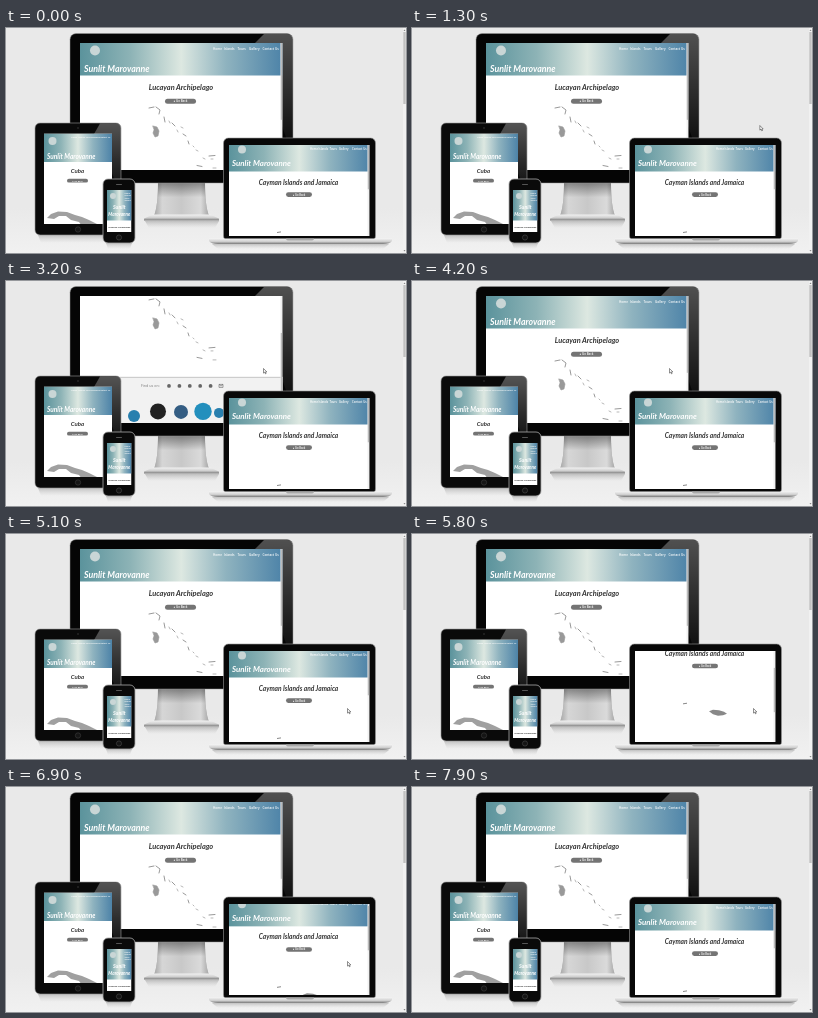
These frames come from a looping animation (400x225 px, 8 s). An HTML page:

```html
<!DOCTYPE html>
<html lang="en">
<head>
<meta charset="utf-8">
<title>Responsive preview</title>
<style>
html, body { margin: 0; width: 100%; height: 100%; overflow: hidden; background: #e9e9e9; }
#stage { display: block; width: 100vw; height: 100vh; }
text { font-family: "Open Sans", sans-serif; }
.script { font-family: Lato, sans-serif; font-style: italic; font-weight: 700; }
.mid { text-anchor: middle; }
.nav { fill: #fff; font-weight: 600; }
</style>
</head>
<body>
<svg id="stage" viewBox="0 0 400 225">
  <defs>
    <linearGradient id="floor" x2="0" y2="1">
      <stop offset=".8" stop-color="#e9e9e9"/><stop offset="1" stop-color="#f1f1f1"/>
    </linearGradient>
    <linearGradient id="sea">
      <stop stop-color="#5b939c"/><stop offset=".25" stop-color="#8db3b6"/>
      <stop offset=".5" stop-color="#dde8e1"/><stop offset=".72" stop-color="#8fb3bf"/>
      <stop offset="1" stop-color="#4d83a8"/>
    </linearGradient>
    <linearGradient id="shine" x2="0" y2="1">
      <stop stop-color="#fff" stop-opacity=".3"/><stop offset="1" stop-color="#fff" stop-opacity="0"/>
    </linearGradient>
    <linearGradient id="neck">
      <stop stop-color="#a5a5a5"/><stop offset=".15" stop-color="#d6d6d6"/>
      <stop offset=".5" stop-color="#c8c8c8"/><stop offset=".85" stop-color="#dadada"/>
      <stop offset="1" stop-color="#a5a5a5"/>
    </linearGradient>
    <linearGradient id="neckShade" x2="0" y2="1">
      <stop stop-color="#000" stop-opacity=".4"/><stop offset=".45" stop-color="#000" stop-opacity="0"/>
    </linearGradient>
    <linearGradient id="metal" x2="0" y2="1">
      <stop stop-color="#f2f2f2"/><stop offset=".55" stop-color="#cfcfcf"/><stop offset="1" stop-color="#777"/>
    </linearGradient>
    <linearGradient id="fade" x2="0" y2="1">
      <stop stop-color="#555" stop-opacity=".3"/><stop offset="1" stop-color="#999" stop-opacity="0"/>
    </linearGradient>
  </defs>
  <rect width="400" height="225" fill="url(#floor)"/>
  <rect x="397" width="3" height="225" fill="#f1f1f1"/>
  <rect x="397.300" y="4" width="2.400" height="72" fill="#c1c1c1"/>
  <path d="M397.500 3l1-1.500 1 1.500zM397.500 222l1 1.500 1-1.500z" fill="#888"/>

  <!-- monitor -->
  <path d="M139 193H213L209 200H143z" fill="url(#fade)"/>
  <path id="neckPlate" d="M152 154H199Q199 178 203 188H148Q152 178 152 154z" fill="url(#neck)"/>
  <use href="#neckPlate" style="fill:url(#neckShade)"/>
  <path d="M152 154H199Q199 178 203 188H148Q152 178 152 154z" fill="url(#neckShade)"/>
  <path d="M147 186.500H204L213 190.500V192.500H138V190.500z" fill="url(#metal)"/>
  <rect x="64" y="5.500" width="223" height="149.500" rx="6" fill="#050505" stroke="#999" stroke-width=".5"/>
  <path d="M258 6H281Q287 6 287 12V130L248 16z" fill="url(#shine)"/>
  <svg id="monitor" x="74" y="15" width="202.500" height="127"></svg>

  <!-- laptop -->
  <path d="M206 216H383L377 221H212z" fill="url(#fade)"/>
  <rect x="217.500" y="110" width="152" height="103" rx="5" fill="#080808" stroke="#999" stroke-width=".6"/>
  <svg id="laptop" x="223" y="117" width="140.500" height="91"></svg>
  <path d="M203 210.500H386V213Q384 216 377 216H212Q205 216 203 213z" fill="url(#metal)"/>
  <path d="M280 210.500H308Q308 212.500 305 212.500H283Q280 212.500 280 210.500" fill="#aaa"/>

  <!-- tablet -->
  <path d="M32 207H112L109 215H35z" fill="url(#fade)"/>
  <rect x="29" y="95" width="86" height="112" rx="5" fill="#0a0a0a" stroke="#999" stroke-width=".6"/>
  <path d="M94 95.500H110Q115 95.500 115 101V165L88 106z" fill="url(#shine)"/>
  <circle cx="72" cy="100" r=".7" fill="#444"/>
  <circle cx="72" cy="201.500" r="2.700" fill="#151515" stroke="#444" stroke-width=".5"/>
  <svg id="tablet" x="38" y="105.500" width="68" height="90.500"></svg>

  <!-- phone -->
  <path d="M100 215H126L124 221H102z" fill="url(#fade)"/>
  <rect x="97" y="151" width="32" height="64" rx="5" fill="#0a0a0a" stroke="#aaa" stroke-width=".8"/>
  <rect x="110" y="156" width="6" height="1" rx=".5" fill="#555"/>
  <circle cx="113" cy="209.500" r="2.600" fill="#151515" stroke="#555" stroke-width=".5"/>
  <svg id="phone" x="101" y="162" width="24.500" height="42"></svg>

  <path id="cursor" d="M0 0V4.600L1.100 3.700 1.900 5.300 2.600 5 1.900 3.400H3.300z" fill="#fff" stroke="#222" stroke-width=".5"/>
</svg>
<script>
const $ = id => document.getElementById(id);
const BRAND = ["Sunlit", "Marovanne"];

const text = (x, y, size, s, cls = "", fill = "#fff") =>
  `<text x="${x}" y="${y}" font-size="${size}" class="${cls}" fill="${fill}">${s}</text>`;
const rect = (x, y, w, h, fill, rx = 0) =>
  `<rect x="${x}" y="${y}" width="${w}" height="${h}" rx="${rx}" fill="${fill}"/>`;
const dot = (x, y, r, fill) => `<circle cx="${x}" cy="${y}" r="${r}" fill="${fill}"/>`;
const logo = (x, y, r) => dot(x, y, r, "#c9d6d6");
const button = (x, y, w, h) =>
  rect(x, y, w, h, "#747474", h / 2) + text(x + w / 2, y + h * .72, h * .58, "● Go Back", "mid nav");
const nav = (xs, y, size) => ["Home", "Islands", "Tours", "Gallery", "Contact Us"]
  .map((s, i) => text(xs[i], y, size, s, "nav")).join("");

// Pages are drawn in stage coordinates and shifted into their screens.
// A page of the given total height scrolls; its thumb follows in proportion.
const pages = {};
function page(id, { head, total, art }) {
  const el = $(id);
  const [x, y, w, h] = ["x", "y", "width", "height"].map(k => +el.getAttribute(k));
  el.innerHTML = rect(0, 0, w, h, "#fff") +
    `<g class="scroll">${rect(0, 0, w, head, "url(#sea)")}<g transform="translate(${-x} ${-y})">${art}</g></g>` +
    (total ? rect(w - 2, 0, 2, h, "#f1f1f1") +
      `<rect class="thumb" x="${w - 1.7}" width="1.400" height="${h * h / total}" fill="#bbb"/>` : "");
  pages[id] = { el, h, total };
}
function scroll(id, part) {
  const { el, h, total } = pages[id], y = part * (total - h);
  el.querySelector(".scroll").setAttribute("transform", `translate(0 ${-y})`);
  el.querySelector(".thumb").setAttribute("y", y * h / total);
}

const bahamas = `<g fill="none" stroke="#999" stroke-linecap="round">
  <path d="M143 80l5-1M150 79l4 3-1 4M158 89l1 5M166 95l3 3M177 106l3 2M182 113l1 3M203 128l6-.5M191 137.500l5 1"/>
  <path stroke-width=".7" d="M163 93l1 2M171 102l1 2M175 99l2 1M187 118l1 1M190 122l2 1M197 130l2 1M205 131h2M207 140h3"/>
  <path fill="#999" stroke-width=".6" d="M147 98l4 1 2 4-1 5-3 1-2-4 1-3z"/></g>`;

const icons = [0, 1, 2, 3, 4].map(i => dot(163 + i * 10.400, 166, 1.900, "#666")).join("") +
  `<path d="M213 164.500h4v3h-4zl2 1.700 2-1.700" fill="none" stroke="#666" stroke-width=".6"/>`;
const badges = dot(128, 196, 6, "#287fae") + dot(152, 191.500, 8, "#222") +
  dot(175, 192, 7, "#345d83") + dot(197, 191.500, 8.700, "#238fbd") + dot(213, 193, 5, "#287fae");
const footer = rect(74, 157, 203, 70, "#f2f2f2") + rect(74, 157, 203, .6, "#aaa") +
  text(135, 167.300, 3.700, "Find us on:", "", "#777") + icons + badges;

page("monitor", {
  head: 32.500, total: 210,
  art: logo(89, 22.500, 5) + nav([207, 218, 231.500, 243, 256.500], 21.700, 3.100) +
    text(78, 43.500, 8.800, BRAND.join(" "), "script") +
    text(175, 61.800, 7.400, "Lucayan Archipelago", "script mid", "#333") +
    button(159, 70.800, 31, 5) + bahamas + footer
});
page("laptop", {
  head: 26.500, total: 187,
  art: logo(236, 121.500, 4) + nav([304, 312.500, 323.500, 333, 346], 122, 2.800) +
    text(226, 138, 7.900, BRAND.join(" "), "script") +
    text(292.500, 156.500, 6.600, "Cayman Islands and Jamaica", "script mid", "#333") +
    button(280, 164.300, 26, 4.600) +
    `<path d="M271 204.500l4-.6" stroke="#888"/>
     <path d="M297 212l4-1.500 6 .5 5 1.500 3 2-4 1.500-5 .5-5-1.500z" fill="#888"/>
     <g transform="translate(171.500 147) scale(.7)">${footer}</g>`
});
page("tablet", {
  head: 28.500,
  art: logo(46.500, 113, 4) + nav([65, 72, 80, 86, 93], 109.800, 2.200) +
    text(41, 131.300, 6.500, BRAND.join(" "), "script") +
    text(71.500, 145, 6, "Cuba", "script mid", "#333") + button(61, 150.800, 21, 3.800) +
    `<path d="M41 190l4-4 7-2.500 9 .5 8 3 7 2 7 3 8 4v2H76l-3-4-8-2-5-4-7 0-5 3z" fill="#a0a0a0"/>`
});
page("phone", {
  head: 30.500,
  art: logo(107, 168, 3) +
    ["Home", "Islands", "Tours", "Gallery"].map((s, i) => text(118.500, 166 + i * 2.300, 1.900, s, "nav")).join("") +
    text(113.300, 181, 5.200, BRAND[0], "script mid") + text(113.300, 187.500, 4.600, BRAND[1], "script mid") +
    text(113.300, 200, 2.500, "Lucayan Archipelago", "script mid", "#333")
});

const ramp = (t, a, b) => {
  const u = Math.min(1, Math.max(0, (t - a) / (b - a)));
  return u * u * (3 - 2 * u);
};
function draw(now) {
  const t = now % 8000;
  scroll("monitor", ramp(t, 2750, 3430) - ramp(t, 3550, 4150));
  scroll("laptop", ramp(t, 5480, 6270) - ramp(t, 6350, 6980));

  const enter = ramp(t, 1200, 2000), cross = ramp(t, 4250, 4800);
  const x = 352 - 94.500 * enter + 84 * cross, y = 98 - 10.500 * enter + 87 * cross;
  $("cursor").setAttribute("transform", `translate(${x} ${y})`);
  $("cursor").style.display = t >= 1200 && t < 7600 ? "" : "none";
  requestAnimationFrame(draw);
}
requestAnimationFrame(draw);
</script>
</body>
</html>
```
